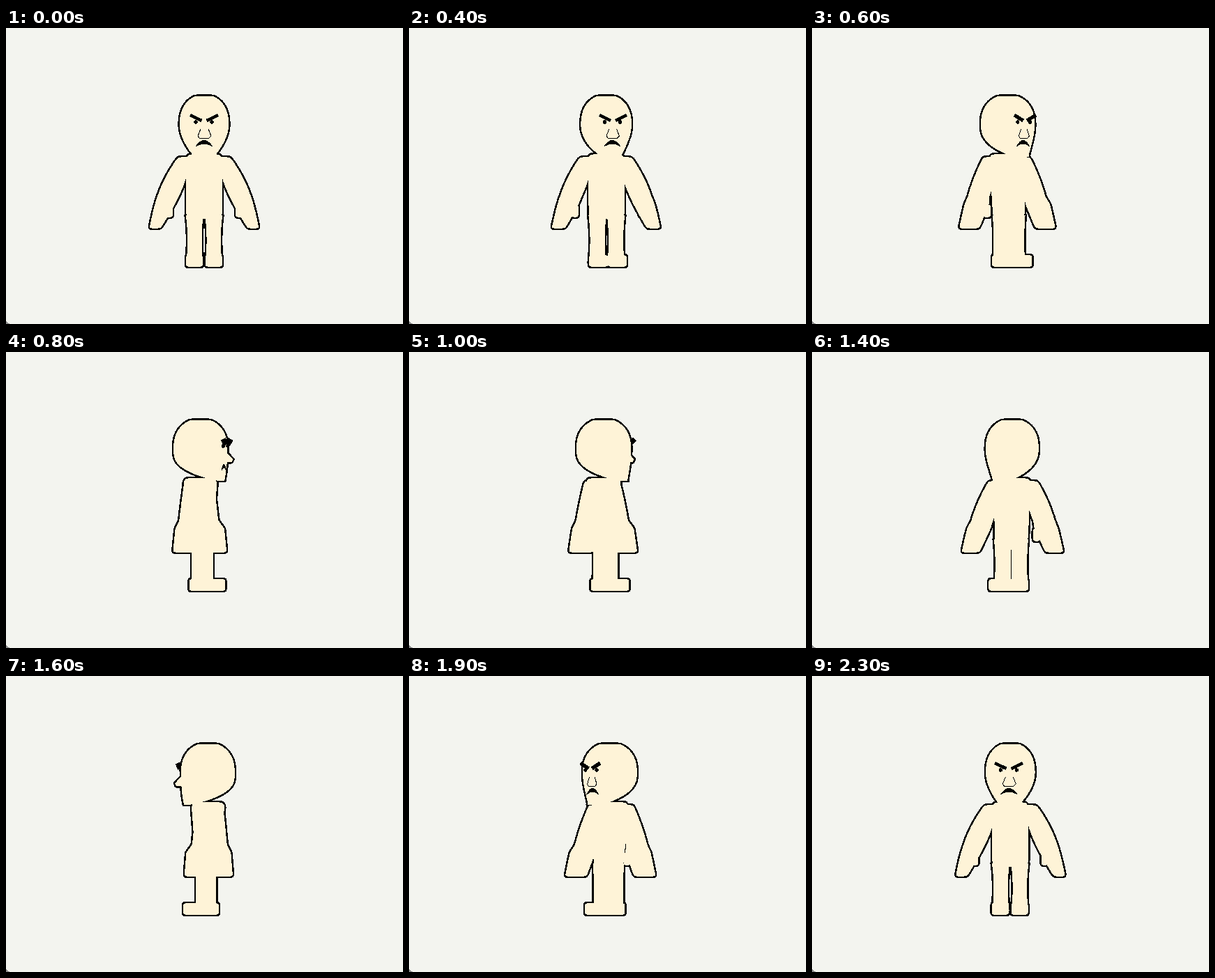
These frames come from a looping animation (569x425 px, 2400 ms). An HTML page:

```html
<!DOCTYPE html>
<html lang="en">
<head>
<meta charset="utf-8">
<title>Turning figure</title>
<style>
  html, body { margin: 0; width: 100%; height: 100%; overflow: hidden; background: #f3f4ef; }
  svg { display: block; width: 100vw; height: 100vh; }
</style>
</head>
<body>
<svg viewBox="0 0 569 425" shape-rendering="crispEdges" stroke="#000" stroke-linejoin="round">
  <path id="outline" stroke-width="5"/>
  <path id="skin" fill="#fef3d7" stroke="none"/>
  <g id="face">
    <path id="brows" fill="none"/>
    <path id="features"/>
    <path id="nose" fill="none"/>
  </g>
  <path d="M0 419Q1 424 6 425H0Z" fill="#8c8c8c" stroke="none"/>
</svg>
<script>
const $ = id => document.getElementById(id);
const AXIS = 284, STEPS = 23.4, LOOP = 2400;
const INSET = 1.2;   // the skin ends this far inside the middle of the outline
const BOXY = 1.7;    // cross-sections: 2 is an ellipse, 1 a box

const clamp = v => Math.min(1, Math.max(0, v));
const smooth = v => (v = clamp(v), v * v * (3 - 2 * v));

// Each part gives its cross-section at height y: centre x, half width, back and front depth.
function headAt(y) {
  if (y < 140) {
    const dome = Math.sqrt(1 - ((140 - y) / 45) ** 2.5);
    return { x: 0, wide: 36.3 * dome, back: -5.5 - 39 * dome, front: -5.5 + 39 * dome };
  }
  const jaw = (y - 140) / 46;
  return {
    x: 0, wide: 36.3 * (1 - 0.6 * jaw ** 1.8),
    back: -44.5 + 67 * jaw ** 3, front: 33.5 - 4 * jaw ** 3
  };
}

function torsoAt(y) {
  const t = (y - 180) / 98;
  return { x: 0, wide: 27, back: -31 + 14 * t, front: 19 - 8 * t };
}

function armAt(y) {
  const t = (y - 184) / 105, hand = smooth((t - 0.53) / 0.15);
  return {
    x: 28 + 43 * t, wide: 9 + 8 * Math.sin(Math.PI * t ** 0.85),
    back: -22 - 5 * hand, front: 6 + 8 * hand
  };
}

const thumbAt = () => ({ x: 50, wide: 6, back: 3, front: 15 });
const legAt = y => ({ x: 13.7, wide: 11.4 + 1.6 * ((y - 305) / 30) ** 2, back: -15, front: 9.5 });
const footAt = () => ({ x: 13.9, wide: 13, back: -19, front: 28 });

const solid = (at, top, bottom, round, side = 1) => ({ at, top, bottom, round, side });
const parts = [solid(headAt, 96.5, 186, 0), solid(torsoAt, 180, 275, 10)];
for (const side of [-1, 1]) parts.push(
  solid(armAt, 184, 289, 5, side),
  solid(thumbAt, 252, 273, 5, side),
  solid(legAt, 268, 338, 0, side),
  solid(footAt, 325, 344, 4, side)
);

const poly = points => "M" + points.map(p => p.map(v => v.toFixed(1)).join(" ")).join("L");

function silhouette({ at, top, bottom, round, side }, cos, sin) {
  const left = [], right = [], count = Math.ceil((bottom - top) / 2);
  for (let i = 0; i <= count; i++) {
    const y = top + (bottom - top) * i / count;
    const { x, wide, back, front } = at(y);
    const mid = AXIS + side * x * cos + (back + front) / 2 * sin;
    const reach = (Math.abs(wide * cos) ** BOXY
      + Math.abs((front - back) / 2 * sin) ** BOXY) ** (1 / BOXY);
    const edge = round ? clamp(Math.min(y - top, bottom - y) / round) : 1;
    const corner = round * (1 - Math.sqrt(1 - (1 - edge) ** 2));
    const half = Math.max(1, reach - corner - INSET);
    const row = Math.min(bottom - INSET, Math.max(top + INSET, y));
    left.push([mid - half, row]);
    right.unshift([mid + half, row]);
  }
  return poly(left.concat(right)) + "Z";
}

function render(angle) {
  const cos = Math.cos(angle), sin = Math.sin(angle);
  const place = (x, y, z) => [AXIS + x * cos + z * sin, y];
  const line = (points, z) => poly(points.map(([x, y]) => place(x, y, z)));

  // The nose tip is part of the profile; both windings must agree for the union.
  const tip = [place(0, 142, 31), place(0, 154, 43), place(0, 158, 41), place(0, 158, 30)];
  if (sin > 0) tip.reverse();
  const body = parts.map(part => silhouette(part, cos, sin)).join("") + poly(tip) + "Z";
  $("outline").setAttribute("d", body);
  $("skin").setAttribute("d", body);

  $("brows").setAttribute("d", [-1, 1].map(s => line([[20 * s, 125], [3.5 * s, 133]], 34)).join(""));
  $("brows").setAttribute("stroke-width", 4.5 + 4 * sin ** 4);

  const eye = x => {
    const [px, py] = place(x, 135, 32);
    return `M${px - 2.2} ${py}a2.2 2.2 0 1 0 4.4 0a2.2 2.2 0 1 0-4.4 0`;
  };
  const lip = (x, y) => place(x, y, 29.5).join(" ");
  const mouth = `M${lip(-11.5, 169.5)}Q${lip(0, 153.5)} ${lip(11.5, 169.5)}Q${lip(0, 163)} ${lip(-11.5, 169.5)}Z`;
  $("features").setAttribute("d", eye(-12) + eye(11) + mouth);

  $("nose").setAttribute("d", cos < 0.4 ? "" : line([
    [-5, 145], [-9, 155], [-7, 158], [7, 158], [10, 155], [6, 145]
  ], 31));

  // Turned away, the face is hidden behind the skin.
  const skin = $("skin");
  skin.parentNode.insertBefore($("face"), cos > 0 ? skin.nextSibling : skin);
}

let shown = -1;
const start = performance.now();
function tick() {
  const time = (performance.now() - start) % LOOP;
  const step = Math.max(0, Math.floor(time / 100) - 1);
  if (step !== shown) {
    shown = step;
    render(Math.PI * (1 - Math.cos(Math.PI * step / STEPS)));
  }
  requestAnimationFrame(tick);
}
tick();
</script>
</body>
</html>
```
